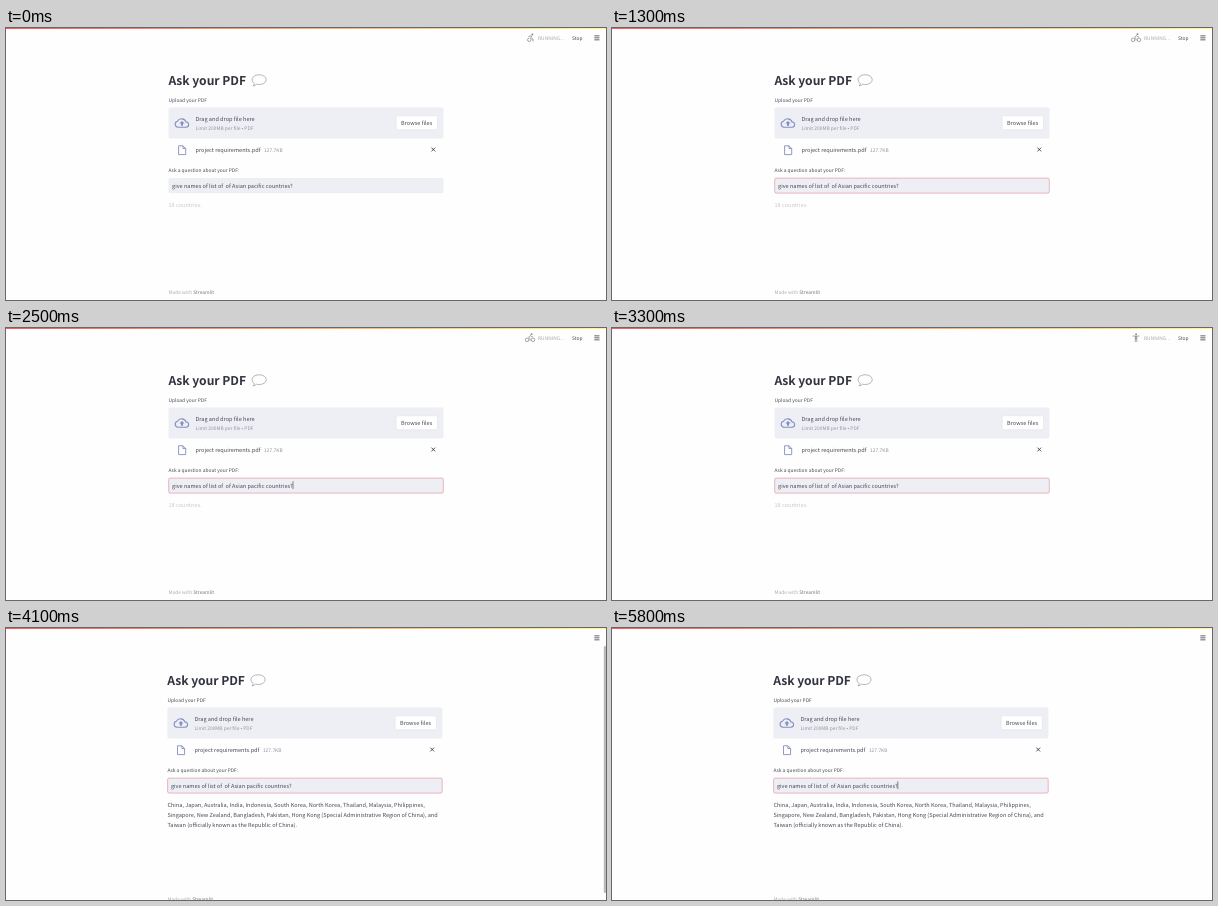
An HTML page with a canvas that plays this animation: 600 by 272 pixels, repeating every 6.3 s.

```html
<!DOCTYPE html>
<html lang="en">
<head>
<meta charset="utf-8">
<title>Ask your PDF</title>
<style>
  html, body { margin: 0; width: 100%; height: 100%; overflow: hidden; background: #fefefe; }
  canvas { display: block; width: 600px; height: 272px; }
</style>
</head>
<body>
<canvas id="stage" width="600" height="272"></canvas>
<script>
const ctx = document.getElementById('stage').getContext('2d');
const LOOP = 6300;
const INK = '#31333f', SOFT_INK = '#474953', GREY = '#94959c', BLUE = '#8390c0', PANEL = '#eeeff4';
const FAMILY = '"Noto Sans CJK JP", "Noto Sans CJK SC", "Noto Sans CJK", "Open Sans", sans-serif';
const LATIN_SCALE = 1.118; // Latin letters in the CJK family are drawn larger than usual
const BODY = 6.23, SMALL = 5.47, TITLE = 13.6;

// Activity symbols on a 24-unit grid: head position and strokes
const ACTIVITIES = [
  { head: [15.5, 3.5], d: 'M9.2 17A4.2 4.2 0 1 1 .8 17A4.2 4.2 0 1 1 9.2 17M23.2 17A4.2 4.2 0 1 1 14.8 17A4.2 4.2 0 1 1 23.2 17M12 19V14L8.5 11L13 6.5L16 10H19' },
  { head: [13.5, 3.5], d: 'M4 18L9 20L11 11L14.5 14V22M6 13V9L11 7L14 10L19 11.5' },
  { head: [16.5, 6.5], d: 'M3 20q2.2-2 4.5 0t4.5 0t4.5 0t4.5 0M3 16q2.2-2 4.5 0t4.5 0t4.5 0t4.5 0M7 14L12 11L8 7L13 5' },
  { head: [13.5, 3.5], d: 'M8 22L11 9L15 14V22M7 13V9L12 7L14 11L18 12.5' },
  { head: [12, 3.5], d: 'M4 8H20M10.3 8V22M13.7 8V22M10 14H14M12 8V14' },
  { head: [17.5, 4], d: 'M14 17A4 4 0 1 1 10 13M8.5 10.5L10 8H16L13 15H19V21' }
].map(({ head, d }) => ({ head, path: new Path2D(d) }));

const CLOUD = new Path2D('M172 99.2A3.05 3.05 0 0 1 171.5 93.2A4.7 4.7 0 0 1 180 93.9A2.65 2.65 0 0 1 180 99.2Z');
const CLOUD_ARROW = new Path2D('M176 92.9L178.6 95.6H177V97.8H175V95.6H173.4Z');
const SHEET = new Path2D('M172.6 117.8H177L179.7 120.5V126.6H172.6ZM177 117.8V120.5H179.7');
const CROSS = new Path2D('M425.4 119.6L429.2 123.4M429.2 119.6L425.4 123.4');
const BUBBLE = new Path2D('M248.3 55.4C245.4 53.6 245.3 49.9 248.2 48.1C251.2 46.2 255.8 46.3 258.4 48.3C260.9 50.3 260.7 53.6 258 55.3C255.9 56.6 252.9 56.8 250.5 56.2C249.6 57.2 248.4 57.8 247 57.9C247.9 57.2 248.3 56.4 248.3 55.4Z');
const POINTER = new Path2D('M0 0V8L1.9 6.4L3.2 9.2L4.5 8.6L3.2 5.9H5.7Z');

const ANSWER = [
  'China, Japan, Australia, India, Indonesia, South Korea, North Korea, Thailand, Malaysia, Philippines,',
  'Singapore, New Zealand, Bangladesh, Pakistan, Hong Kong (Special Administrative Region of China), and',
  'Taiwan (officially known as the Republic of China).'
];

// Text is laid out ten times larger so that small advances are not rounded
function text(str, x, y, size = BODY, color = SOFT_INK, weight = 400, tracking = 0) {
  ctx.save();
  ctx.translate(x, y);
  ctx.scale(0.1, 0.1);
  ctx.font = `${weight} ${size * 10 / LATIN_SCALE}px ${FAMILY}`;
  ctx.letterSpacing = `${tracking * size * 10}px`;
  ctx.textRendering = 'geometricPrecision';
  ctx.fillStyle = color;
  ctx.fillText(str, 0, 0);
  const width = ctx.measureText(str).width / 10;
  ctx.restore();
  return width;
}

function box(x, y, w, h, r, fill, stroke, lineWidth = 0.5) {
  ctx.beginPath();
  ctx.roundRect(x, y, w, h, r);
  if (fill) { ctx.fillStyle = fill; ctx.fill(); }
  if (stroke) { ctx.strokeStyle = stroke; ctx.lineWidth = lineWidth; ctx.stroke(); }
}

function outline(path, color, width) {
  ctx.strokeStyle = color;
  ctx.lineWidth = width;
  ctx.stroke(path);
}

function topBar() {
  const g = ctx.createLinearGradient(0, 0, 600, 0);
  g.addColorStop(0, '#f8484c');
  g.addColorStop(1, '#fff77c');
  ctx.fillStyle = g;
  ctx.fillRect(0, 0, 600, 0.9);
  for (let i = 0; i < 3; i++) box(588.3, 7.5 + i * 2, 5.2, 0.75, 0.2, INK);
}

function status(t) {
  const alpha = t < 3500 ? 1 : t < 3600 ? 0.5 : t < 3700 ? 0.25 : 0;
  if (!alpha) return;
  const { head, path } = ACTIVITIES[Math.floor((t + 1100) / 200) % ACTIVITIES.length];
  ctx.save();
  ctx.globalAlpha = alpha;
  text('RUNNING...', 532, 11.6, SMALL, '#a6a7ad');
  text('Stop', 566, 11.6, SMALL);
  ctx.translate(519, 4.7);
  ctx.scale(0.42, 0.42);
  outline(path, '#808188', 1.7);
  ctx.beginPath();
  ctx.arc(...head, 2.1, 0, 7);
  ctx.fillStyle = '#808188';
  ctx.fill();
  ctx.restore();
}

function uploader() {
  text('Ask your PDF', 162.4, 57, TITLE, INK, 600, -0.005);
  outline(BUBBLE, '#7c7d84', 0.55);
  text('Upload your PDF', 162.5, 73.6, SMALL);
  box(162.5, 79.6, 275, 30.8, 1.6, PANEL);
  outline(CLOUD, BLUE, 1.1);
  ctx.fillStyle = BLUE;
  ctx.fill(CLOUD_ARROW);
  text('Drag and drop file here', 189.5, 92.9);
  text('Limit 200MB per file • PDF', 189.5, 102.2, SMALL, GREY);
  box(390.2, 87.8, 41.3, 14, 1.6, '#fff', '#d9dade', 0.4);
  text('Browse files', 395.1, 97.1);
  outline(SHEET, BLUE, 0.9);
  text('project requirements.pdf', 189.5, 123.8);
  text('127.7KB', 258, 123.8, SMALL, GREY);
  outline(CROSS, INK, 0.85);
}

function caretVisible(t) {
  const toggles = [400, 900, 1500, 2000, 2500, 3000, 3600, 4100, 4600, 5200, 5700];
  return toggles.filter(at => t >= at).length % 2 === 1;
}

function question(t) {
  text('Ask a question about your PDF:', 162.5, 143.7, SMALL);
  box(162.5, 149.9, 275, 15.4, 1.6, PANEL);
  const focus = t < 400 ? 0 : t < 500 ? 0.5 : 1;
  if (focus) box(162.7, 150.1, 274.6, 15, 1.6, null, `rgba(226,92,108,${focus})`, 0.42);
  text('give names of list of  of Asian pacific countries?', 166, 159.7);
  if (caretVisible(t)) {
    ctx.fillStyle = INK;
    ctx.fillRect(286.7, 153.3, 0.6, 7.8);
  }
}

function footer(y) {
  const w = text('Made with ', 162.5, y, SMALL, '#adadb2');
  text('Streamlit', 162.5 + w, y, SMALL, '#75767e');
}

// The pointer slides out of the lower right corner
function pointer(t) {
  if (t < 5200 || t >= 5800) return;
  const p = Math.max(0, (t - 5300) / 500) ** 1.3;
  ctx.save();
  ctx.translate(353.3 + 250 * p, 175.6 + 92 * p);
  ctx.fillStyle = '#fff';
  ctx.fill(POINTER);
  outline(POINTER, '#333', 0.6);
  ctx.restore();
}

function draw(time) {
  const t = Math.floor((time % LOOP) / 100) * 100;
  const answered = t >= 3500;
  ctx.fillStyle = '#fefefe';
  ctx.fillRect(0, 0, 600, 272);
  topBar();
  status(t);

  ctx.save();
  if (answered) ctx.translate(-1.1, 0); // room taken by the scrollbar
  uploader();
  question(t);
  if (answered) ANSWER.forEach((line, i) => text(line, 162.5, 178.9 + i * 10));
  else text('18 countries.', 162.5, 179, BODY, '#c9c9cd');
  footer(answered ? 273.4 : 265.8);
  ctx.restore();

  if (answered && t < 5800) box(597.8, 18, 2.2, 247, 1, '#b9bac0');
  pointer(t);
}

const start = performance.now();
(function frame() {
  draw(performance.now() - start);
  requestAnimationFrame(frame);
})();
</script>
</body>
</html>
```
